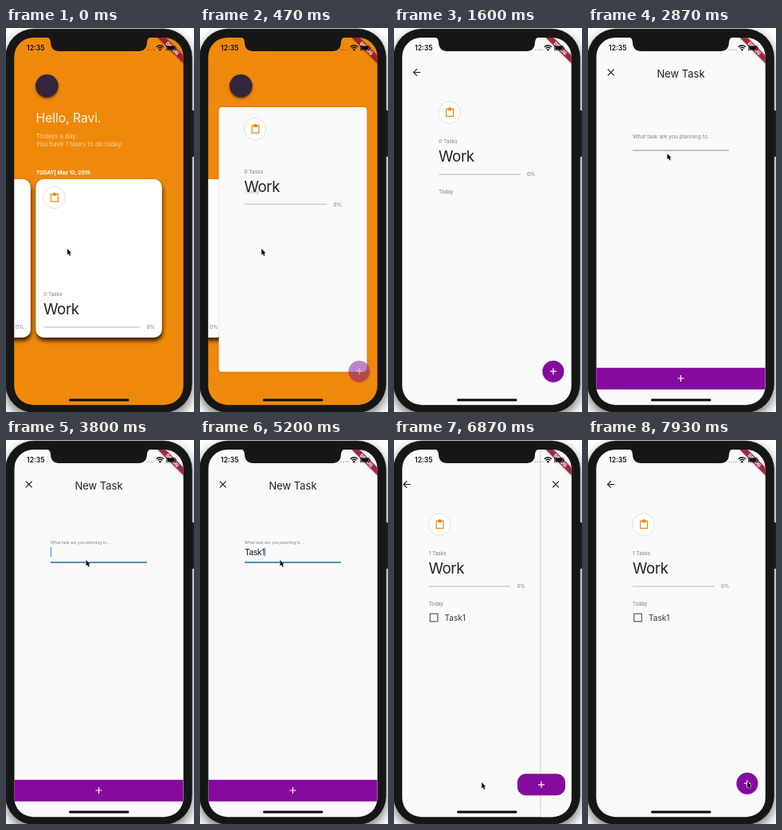
An HTML page with a canvas that plays this animation: 236 px wide and 480 px high, repeating every 8000 ms.

```html
<!DOCTYPE html>
<html lang="en">
<head>
<meta charset="utf-8">
<title>To-do app</title>
<style>
html, body { margin: 0; width: 100%; height: 100%; overflow: hidden; background: #fff; }
canvas { display: block; width: 236px; height: 480px; }
</style>
</head>
<body>
<canvas id="stage"></canvas>
<script>
const W = 236, H = 480, LOOP = 8000;
const SCREEN = { x: 10.3, y: 12, w: 212.4, h: 459.2 };
const ORANGE = '#ef890b', PURPLE = '#850b9f', PAGE = '#fafafa', INK = '#222', GREY = '#7d7d7d', BEZEL = '#161617';

const canvas = document.getElementById('stage');
const dpr = window.devicePixelRatio || 1;
canvas.width = W * dpr;
canvas.height = H * dpr;
const c = canvas.getContext('2d');

const clamp = v => Math.max(0, Math.min(1, v));
const lerp = (a, b, p) => a + (b - a) * p;
const span = (t, a, b) => clamp((t - a) / (b - a));
const smooth = p => p * p * (3 - 2 * p);
const easeOut = (p, k) => 1 - Math.pow(1 - p, k);

function text(str, x, y, size, color, { weight = 400, align = 'left', spacing = 0 } = {}) {
  c.font = `${weight} ${size}px Inter, "Open Sans", sans-serif`;
  c.textAlign = align;
  c.letterSpacing = spacing + 'px';
  c.fillStyle = color;
  c.fillText(str, x, y);
}

function box(x, y, w, h, r, fill) {
  c.beginPath();
  c.roundRect(x, y, w, h, r);
  c.fillStyle = fill;
  c.fill();
}

function disc(x, y, r, fill) {
  c.beginPath();
  c.arc(x, y, r, 0, 7);
  c.fillStyle = fill;
  c.fill();
}

// Each argument after the style is one polyline [x, y, x, y, ...]
function lines(color, width, ...paths) {
  c.beginPath();
  for (const p of paths)
    for (let i = 0; i < p.length; i += 2) c[i ? 'lineTo' : 'moveTo'](p[i], p[i + 1]);
  c.strokeStyle = color;
  c.lineWidth = width;
  c.stroke();
}

function layer(draw, { alpha = 1, dx = 0, shadow } = {}) {
  c.save();
  c.globalAlpha *= alpha;
  c.translate(dx, 0);
  if (shadow) {
    c.shadowColor = shadow.color;
    c.shadowBlur = shadow.blur * dpr;
    c.shadowOffsetX = (shadow.x || 0) * dpr;
    c.shadowOffsetY = (shadow.y || 0) * dpr;
  }
  draw();
  c.restore();
}

function plus(x, y) {
  lines('#fff', 1.2, [x - 4, y, x + 4, y], [x, y - 4, x, y + 4]);
}

function clipboard(x, y) {
  disc(x, y, 13.8, '#fff');
  c.strokeStyle = '#d8d8d8';
  c.lineWidth = 0.8;
  c.stroke();
  c.strokeStyle = ORANGE;
  c.lineWidth = 1.2;
  c.strokeRect(x - 4, y - 4.5, 8.8, 9.4);
  box(x - 2, y - 4.9, 4.8, 2.6, 0, ORANGE);
  disc(x + 0.4, y - 5, 1.4, ORANGE);
}

// Card contents; px and py move them from the card (0) to the page (1)
function summary(px, py, count) {
  const x = lerp(47, 56, px), drop = lerp(191, 0, py);
  clipboard(lerp(60.5, 69.7, px), lerp(212, 105.5, py));
  text(count + ' Tasks', x, 144.3 + drop, 6.5, GREY);
  text('Work', x, 167.3 + drop, 18.8, INK, { spacing: -0.45 });
  box(x, 182.2 + drop, lerp(121, 103, px), 1.6, 0.8, '#cfcfcf');
  text('0%', lerp(176.5, 167, px), 185.4 + drop, 6.5, GREY);
}

function home() {
  box(0, 0, W, H, 0, ORANGE);
  layer(() => disc(51.4, 72.3, 14.3, '#33263c'), { shadow: { color: 'rgba(0,0,0,.5)', blur: 3, y: 1.5 } });
  text('Hello, Ravi.', 37.6, 118, 15.6, '#fff5e6');
  text('Todays a day.', 37.8, 138, 7.95, '#fac98a', { weight: 500 });
  text('You have 1 tasks to do today.', 37.8, 147.8, 7.95, '#fac98a', { weight: 500 });
  text('TODAY| May 12, 2019', 37.9, 183, 6.5, '#fff', { weight: 700 });
  const shadow = { color: 'rgba(40,15,0,.9)', blur: 5, x: 0.8, y: 4 };
  for (const x of [-127.5, 37.4]) layer(() => box(x, 189, 158.4, 198, 10, '#fff'), { shadow });
  text('0%', 12, 376.4, 6.5, GREY);
}

function arrow() {
  lines(INK, 1.2, [33.3, 55.5, 25, 55.5], [28.9, 51.2, 24.6, 55.5, 28.9, 59.8]);
}

function fab() {
  layer(() => disc(199.9, 429.2, 13.5, PURPLE), { shadow: { color: 'rgba(0,0,0,.18)', blur: 2, y: 1 } });
  plus(199.9, 429.2);
}

function expanding(t) {
  home();
  const u = span(t, 70, 870), p = easeOut(u, 1.02), q = easeOut(u, 2.35);
  if (u > 0) {
    const x = lerp(37.4, SCREEN.x, p), y = lerp(189, SCREEN.y, p);
    const w = lerp(195.8, 222.7, p) - x, h = lerp(387, 471, p) - y;
    layer(() => box(x, y, w, h, lerp(10, 0, clamp(p * 1.2)), PAGE), { shadow: { color: 'rgba(60,30,0,.25)', blur: 2 } });
    layer(() => text('Today', 56, 206.7, 6.4, GREY), { alpha: span(u, 0.25, 0.75) });
    layer(fab, { alpha: span(u, 0.2, 0.88) });
    layer(arrow, { alpha: span(u, 0.8, 1) });
  }
  summary(easeOut(u, 4), q, 0);
}

function detail(count) {
  box(0, 0, W, H, 0, PAGE);
  arrow();
  summary(1, 1, count);
  text('Today', 56, 206.7, 6.4, GREY);
  if (count) {
    c.strokeStyle = '#666';
    c.lineWidth = 1.3;
    c.strokeRect(57.8, 217.2, 9.6, 9.6);
    text('Task1', 76, 226, 10.1, '#383838');
  }
}

function newTask(t) {
  const focus = t < 6530 ? smooth(span(t, 3470, 3800)) : 0;
  const typed = 'Task1'.slice(0, [4600, 4730, 4800, 4930, 5200].filter(k => t >= k).length);
  box(SCREEN.x, 0, W, H, 0, PAGE);
  lines(INK, 1.3, [24.8, 51.6, 32.6, 59.4], [32.6, 51.6, 24.8, 59.4]);
  text('New Task', 116.5, 61.8, 13, INK, { align: 'center' });
  text('What task are you planning to ...', 56, lerp(138, 130.3, focus), lerp(6.7, 5, focus), '#808080');
  lines('#8c8c8c', 1, [56, 153, 177, 153]);
  if (focus) {
    lines('#2580c8', 1.4, [116.5 - 60.5 * focus, 153, 116.5 + 60.5 * focus, 153]);
    text(typed, 56, 143.5, 10.5, '#111', { spacing: -0.5 });
    const end = 56.5 + (typed ? c.measureText(typed).width + 0.4 : 0);
    lines('#4a90d9', 1, [end, 134, end, 146]);
  }
}

// The round button grows into the bottom bar as p goes from 0 to 1
function morphButton(p) {
  if (p === 0) return fab();
  const x = lerp(186.4, SCREEN.x, p), y = lerp(415.7, 424.8, p);
  const w = lerp(27, SCREEN.w, p), h = 27;
  box(x, y, w, h, lerp(13.5, 0, p), PURPLE);
  plus(x + w / 2, y + h / 2 - 0.3 * p);
}

function pages(t) {
  const p = t < 5000 ? easeOut(span(t, 2130, 2530), 2.4) : 1 - easeOut(span(t, 6600, 7130), 2.4);
  if (p < 1) layer(() => detail(t < 6530 ? 0 : 1), { dx: -70 * p });
  if (p > 0) {
    const dx = SCREEN.w * (1 - p);
    if (p < 1) lines('rgba(0,0,0,.12)', 3, [SCREEN.x + dx, 0, SCREEN.x + dx, H]);
    layer(() => newTask(t), { dx });
  }
  morphButton(p);
}

function banner() {
  c.save();
  c.translate(222.5, 12);
  c.rotate(Math.PI / 4);
  layer(() => box(-40, 15.8, 80, 6.8, 0, 'rgba(158,25,48,.88)'), { shadow: { color: 'rgba(0,0,0,.4)', blur: 3 } });
  text('DEBUG', 0, 21.3, 5.9, '#fff', { weight: 800, align: 'center' });
  c.restore();
}

function statusBar() {
  text('12:35', 26, 28.4, 8.6, '#111', { weight: 600 });
  for (let i = 0; i < 4; i++) disc(177.2 + i * 2.9, 27.2, 0.7, 'rgba(0,0,0,.4)');
  c.strokeStyle = '#111';
  c.lineWidth = 1.4;
  for (const r of [6.2, 3.8]) {
    c.beginPath();
    c.arc(193.4, 28, r, -2.4, -0.74);
    c.stroke();
  }
  disc(193.4, 27.2, 1.2, '#111');
  c.lineWidth = 0.6;
  c.strokeRect(201.6, 22.3, 10.6, 5.6);
  box(202.4, 23.1, 9, 4, 0.6, '#111');
  box(212.8, 24, 0.9, 2.2, 0.4, '#111');
}

function screenClip() {
  c.beginPath();
  c.roundRect(SCREEN.x, SCREEN.y, SCREEN.w, SCREEN.h, 24);
  c.clip();
}

function phone() {
  box(0, 0, W, H, 0, '#fff');
  layer(() => box(-0.8, 0.8, 234.6, 480, 36, '#333'), { shadow: { color: 'rgba(0,0,0,.55)', blur: 14, y: 6 } });
  box(232, 103, 4, 58, 1, '#1c1c1e');
  box(-0.2, 1.5, 233.4, 478.8, 35, BEZEL);
}

function notch() {
  c.beginPath();
  c.moveTo(50, 11);
  c.quadraticCurveTo(56, 12, 56, 18);
  c.quadraticCurveTo(56.5, 29, 67, 29);
  c.lineTo(166, 29);
  c.quadraticCurveTo(176.5, 29, 177, 18);
  c.quadraticCurveTo(177, 12, 183, 11);
  c.fillStyle = BEZEL;
  c.fill();
}

// Time, x, y of the pointer tip
const POINTER = [
  [0, 77, 276], [470, 77, 276], [600, 110, 282], [870, 176, 380], [1000, 176, 380],
  [1130, 161, 221], [1330, 161, 221], [1400, 128, 187], [1590, 240, 320], [1870, 240, 320],
  [2070, 206, 416], [2730, 206, 416], [2870, 99.5, 157], [3130, 100.5, 150], [5670, 100.5, 150],
  [6470, 110, 428], [7400, 110, 428], [7700, 226, 420], [7930, 200, 427], [8000, 200, 427]
];

function pointer(t) {
  const i = POINTER.findIndex(k => k[0] > t);
  const [t0, x0, y0] = POINTER[i - 1], [t1, x1, y1] = POINTER[i];
  const p = span(t, t0, t1);
  c.save();
  c.translate(lerp(x0, x1, p), lerp(y0, y1, p));
  c.scale(0.92, 0.92);
  c.lineJoin = 'round';
  c.beginPath();
  for (const [x, y] of [[0, 0], [0, 8], [1.8, 6.4], [3.2, 9.4], [4.6, 8.8], [3.3, 5.8], [5.6, 5.6]]) c.lineTo(x, y);
  c.closePath();
  c.strokeStyle = '#fff';
  c.lineWidth = 1;
  c.stroke();
  c.fillStyle = '#000';
  c.fill();
  c.restore();
}

function render(t) {
  c.setTransform(dpr, 0, 0, dpr, 0, 0);
  phone();
  c.save();
  screenClip();
  t < 870 ? expanding(t) : pages(t);
  banner();
  statusBar();
  box(79, 463.6, 75.5, 3, 1.5, '#0a0a0a');
  c.restore();
  notch();
  pointer(t);
}

const start = performance.now();
function tick() {
  render((performance.now() - start) % LOOP);
  requestAnimationFrame(tick);
}
tick();
</script>
</body>
</html>
```
